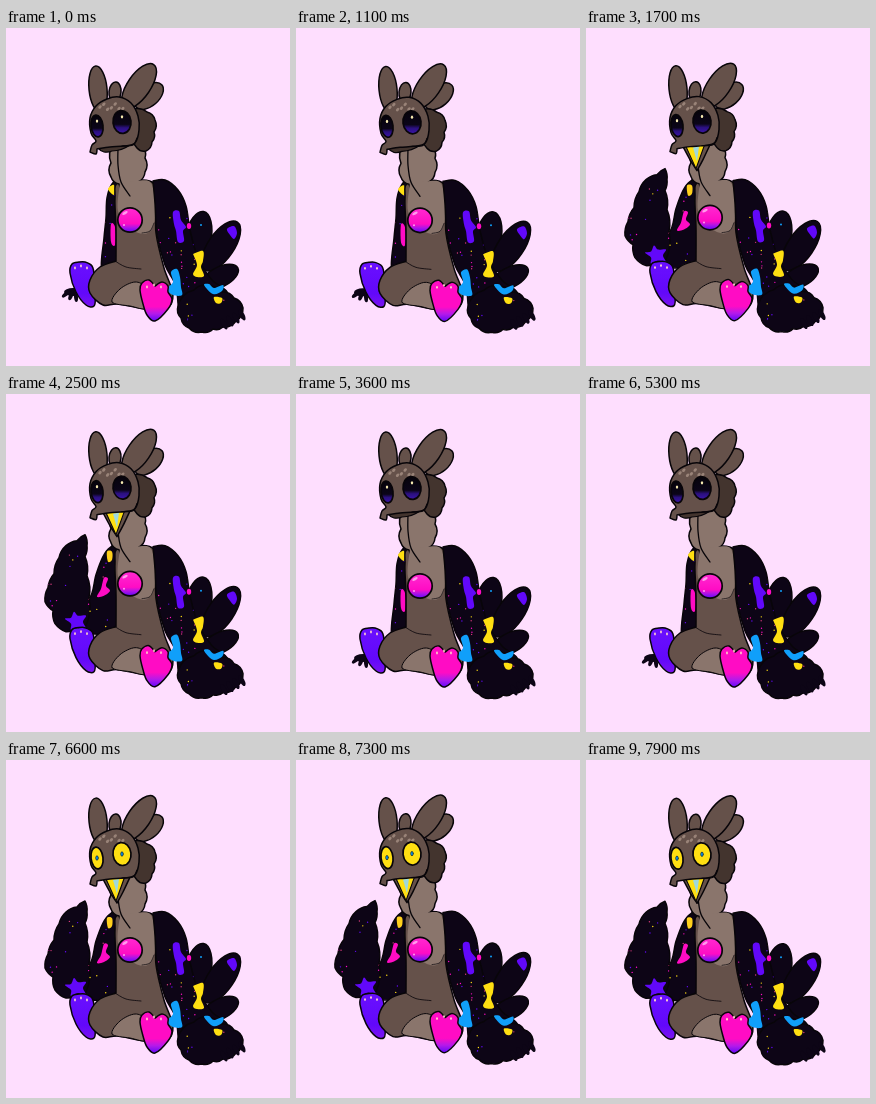
Animation, 284 px wide and 338 px high, one loop 8 s. Source, as an HTML page with a canvas:

```html
<!DOCTYPE html>
<html lang="en">
<head>
<meta charset="utf-8">
<title>Feathered creature</title>
<style>
html, body { margin: 0; width: 100%; height: 100%; overflow: hidden; background: #fedefe; }
canvas { display: block; }
</style>
</head>
<body>
<canvas id="stage" width="284" height="338"></canvas>
<script>
const ctx = document.getElementById('stage').getContext('2d');
const INK = '#080509', BLACK = '#0d0516', BROWN = '#65514a', DARK = '#43342e', LIGHT = '#8a756c',
  PINK = '#ff0cc4', PURPLE = '#6208fa', YELLOW = '#ffdf12', CYAN = '#109ffa';
const LOOP = 8000, STEP = 100;

const parse = s => s.split(' ').map(p => p.split(',').map(Number));

// Smooth curve through the points; a repeated point makes a corner.
function curve(text, closed = true) {
  const pts = parse(text), n = pts.length, path = new Path2D();
  const at = i => pts[closed ? (i + n) % n : Math.max(0, Math.min(n - 1, i))];
  path.moveTo(...at(0));
  for (let i = 0; i < (closed ? n : n - 1); i++) {
    const [a, b, c, d] = [at(i - 1), at(i), at(i + 1), at(i + 2)];
    if (b[0] === c[0] && b[1] === c[1]) continue;
    path.bezierCurveTo(b[0] + (c[0] - a[0]) / 6, b[1] + (c[1] - a[1]) / 6,
      c[0] - (d[0] - b[0]) / 6, c[1] - (d[1] - b[1]) / 6, ...c);
  }
  return path;
}

// Clockwise polygon whose edges bow outwards like fluffy feathers.
function fluff(text, bulge = 0.3) {
  const pts = parse(text), path = new Path2D();
  path.moveTo(...pts[0]);
  pts.forEach(([x, y], i) => {
    const [u, v] = pts[(i + 1) % pts.length];
    path.quadraticCurveTo((x + u) / 2 + (v - y) * bulge, (y + v) / 2 - (u - x) * bulge, u, v);
  });
  return path;
}

function paint(path, fill, line = 1.5) {
  if (fill) { ctx.fillStyle = fill; ctx.fill(path); }
  if (line) { ctx.strokeStyle = INK; ctx.lineWidth = line; ctx.stroke(path); }
}
const shape = (pts, fill, line) => paint(curve(pts), fill, line);
const stroke = (pts, line = 1.2) => paint(curve(pts, false), null, line);

function oval(x, y, rx, ry, fill, line = 0, turn = 0) {
  const path = new Path2D();
  path.ellipse(x, y, rx, ry, turn, 0, 7);
  paint(path, fill, line);
}

function fade(y0, y1, ...stops) {
  const g = ctx.createLinearGradient(0, y0, 0, y1);
  stops.forEach(([at, color]) => g.addColorStop(at, color));
  return g;
}

// Tiny coloured dots scattered inside a shape.
function specks(path, x, y, w, h, count, seed) {
  const rnd = () => (seed = (seed * 16807) % 2147483647) / 2147483647;
  ctx.save();
  ctx.clip(path);
  for (let i = 0; i < count; i++) {
    oval(x + rnd() * w, y + rnd() * h, 0.7, 0.7, [PINK, PURPLE, YELLOW, PURPLE, '#d83a7c'][i % 5]);
  }
  ctx.restore();
}

// Sparkles along the top of a paw.
function sparkles(x, y, gap) {
  for (let i = 0; i < 3; i++) oval(x + i * gap, y - (i === 1 ? 2 : 0), 0.9, 1.4, '#ffd0c8');
}

function tail() {
  oval(192, 211, 13, 28, BLACK, 1.5, 0.2);
  oval(215, 218, 13, 29, BLACK, 1.5, 0.6);
  oval(214, 249, 10, 20, BLACK, 1.5, 1.1);
  shape('221,201 228,198 231,205 228,211 224,207', PURPLE, 0);
  oval(195, 197, 1, 1, CYAN);
}

function wing() {
  const arm = curve('147,153 147,153 159,152 172,162 180,178 184,202 192,230 206,252 222,266 215,292 190,296 174,284 170,258 159,237 151,207 149,175');
  paint(arm, BLACK);
  paint(fluff('188,262 203,258 216,264 228,270 237,280 230,293 217,299 207,301 196,304 183,300 175,290 172,278'), BLACK);
  for (let i = 0; i < 4; i++) oval(218 + 6 * i, 296 - 3 * i, 2.4, 6, BLACK, 0, -0.5);
  specks(arm, 152, 158, 70, 138, 55, 1234);
  shape('167,184 173,183 175,192 180,199 177,203 178,213 172,214 170,203 168,196', PURPLE, 0);
  oval(183, 198, 2.2, 3, PINK);
  shape('187,226 187,226 197,223 197,233 195,239 198,248 191,249 187,246 191,237', YELLOW, 0);
  shape('165,244 171,241 174,249 175,259 176,267 167,267 161,261 167,254', CYAN, 0);
  shape('198,257 203,256 208,260 217,257 216,263 207,266', CYAN, 0);
  shape('208,269 216,270 215,275 210,275', YELLOW, 0);
}

function armDown() {
  const arm = curve('112,154 106,156 101,170 100,190 98,210 96,242 112,242 112,190');
  paint(arm, BLACK);
  specks(arm, 98, 160, 14, 75, 10, 321);
  shape('102,161 108,157 108,167', YELLOW, 0);
  shape('105,196 109,199 109,217 105,214', PINK, 0);
  oval(67, 264, 9, 4, BLACK);
  for (let i = 0; i < 3; i++) oval(60 + 5 * i, 266 + 1.5 * i, 2, 5, BLACK, 0, 0.9 - 0.5 * i);
}

function armUp() {
  const upper = curve('112,153 104,154 97,163 90,181 83,205 60,212 54,232 76,239 108,236 111,195');
  const fore = fluff('71,147 79,141 81,152 79,163 81,182 83,204 80,232 60,238 49,230 47,217 39,208 42,194 48,180 53,164 60,152', 0.16);
  paint(upper, BLACK);
  paint(fore, BLACK);
  specks(fore, 42, 155, 40, 78, 16, 321);
  specks(upper, 60, 160, 50, 75, 16, 9);
  shape('101,158 106,158 106,166 102,168', '#ffd01c', 0);
  shape('98,184 102,185 100,192 104,197 98,202 91,203 95,195', PINK, 0);
  shape('68,218 72,222 80,222 77,228 80,235 72,233 65,236 65,230 59,225 65,224', PURPLE, 0);
}

function leftFoot() {
  shape('64,245 66,236 73,234 79,234 86,238 88,248 86,258 89,268 88,278 80,277 70,264', fade(233, 279, [0, '#6a10ff'], [0.7, PURPLE], [1, '#7a14ee']));
  sparkles(69, 240, 6);
}

function body() {
  shape('113,154 109,170 110,200 110,233 110,233 94,239 84,252 84,265 97,277 112,276 139,281 160,281 167,266 158,240 150,205 150,175 146,154', BROWN);
  shape('106,274 114,261 129,254 139,260 141,280 124,278', LIGHT, 1);
  stroke('109,233 120,239 135,241', 0.8);
}

function neck() {
  paint(fluff('108,116 137,120 139,130 139,144 132,154 125,168 113,156 105,149 105,135'), LIGHT);
  shape('114,155 114,155 112,183 124,200 138,206 147,199 149,180 145,155 130,153', LIGHT, 0);
  stroke('136,205 144,203 148,195', 0.7);
  stroke('112,120 112,137 115,154 124,168', 1.3);
}

function ball(y) {
  oval(124, y, 12.2, 12.2, fade(y - 12, y + 12, [0, '#ff2ad0'], [0.65, PINK], [0.8, '#b414e4'], [1, PURPLE]), 1.7);
  oval(119, y - 7, 3, 1.3, '#ff9bec', 0, -0.5);
  oval(118, y + 5, 1, 1, '#ff9bec');
}

function rightFoot() {
  shape('134,262 136,255 143,252 149,258 149,258 156,254 162,258 162,264 166,271 162,281 149,293 141,287 137,276',
    fade(252, 293, [0, PINK], [0.65, PINK], [0.82, '#b51ae9'], [1, PURPLE]));
  sparkles(141, 259, 7);
}

function eye(x, y, rx, ry, glow) {
  const deep = fade(y - ry, y + ry, [0, '#06030b'], [0.6, '#0b0518'], [0.75, '#2b1080'], [1, '#3a14a8']);
  oval(x, y, rx, ry, glow ? YELLOW : deep, 1.7, -0.12);
  if (glow) oval(x, y, 1.3, 2.2, CYAN, 0.6);
  else oval(x, y - ry * 0.45, 1.2, 1.6, '#f5e9b0');
}

function head(open, glow) {
  // Crest feathers and cheek fluff.
  oval(143, 68, 10, 17, BROWN, 1.5, 0.85);
  oval(133, 58, 11.5, 26, BROWN, 1.5, 0.6);
  oval(109, 64, 6, 10, BROWN, 1.5, 0.1);
  oval(92, 61, 9, 23, BROWN, 1.5, -0.1);
  paint(fluff('125,82 141,84 149,92 148,104 146,114 140,123 131,120'), DARK);
  if (open) {
    shape('97,119 97,119 104,132 111,143 111,143 117,132 125,115 125,115', BROWN);
    shape('100,119 100,119 110,141 110,141 119,116 119,116', YELLOW, 1.1);
    shape('107,120 107,120 111,134 111,134 113,119 113,119', '#9fd9dc', 0);
  } else {
    paint(fluff('92,120 124,117 106,123 98,124', 0.15), DARK, 1.2);
  }
  shape('84,90 90,78 101,71 113,69 125,75 132,88 133,102 129,115 118,118 104,119 91,121 91,121 90,126 84,124 84,124 86,117 90,113 85,105', BROWN);
  stroke('131,110 127,117 116,118', 1.2);
  for (let i = 0; i < 7; i++) oval(94 + 3.8 * i, 79 - 3 * Math.sin(i * 2), 2, 1.4, '#998378', 0, -0.8);
  eye(91, 98, 6, 11, glow);
  eye(116, 94, 9, 11.5, glow);
}

const inside = (t, spans) => spans.some(([from, to]) => t >= from && t < to);

function draw(time) {
  const t = Math.floor(time % LOOP / STEP) * STEP;
  const up = inside(t, [[1200, 3400], [4500, 5100], [6300, LOOP]]);
  const lively = inside(t, [[1100, 3600], [4400, 5300], [6300, LOOP]]);
  ctx.fillStyle = '#fedefe';
  ctx.fillRect(0, 0, 284, 338);
  ctx.lineJoin = ctx.lineCap = 'round';
  ctx.save();
  if (lively) ctx.translate(0, 0.4 * Math.sin(t / 150));
  tail();
  (up ? armUp : armDown)();
  leftFoot();
  body();
  neck();
  wing();
  ball(up ? 190 : 192);
  rightFoot();
  head(up, t >= 6300);
  ctx.restore();
}

const start = performance.now();
function tick() {
  draw(performance.now() - start);
  requestAnimationFrame(tick);
}
tick();
</script>
</body>
</html>
```
